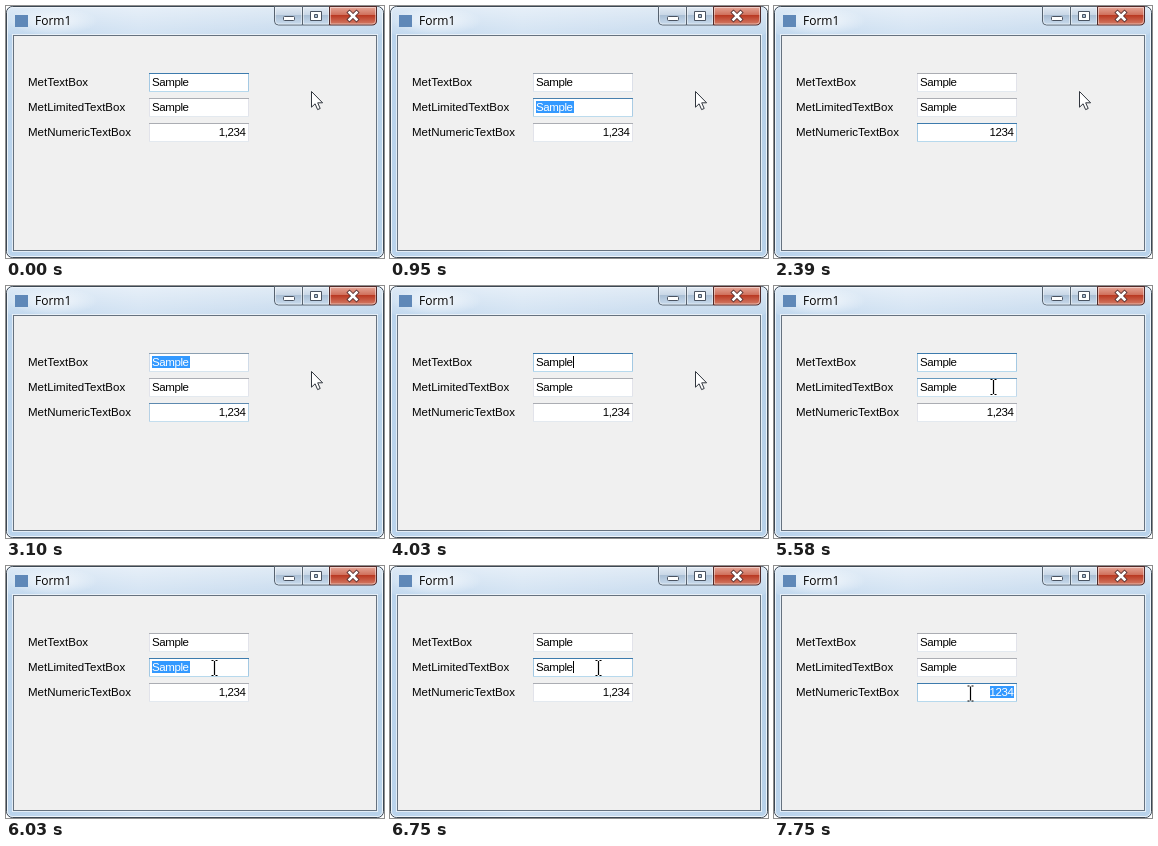
Recreate the animation shown at these times as an HTML page. Size 378x252 px, loop 8 s.

```html
<!DOCTYPE html>
<html lang="en">
<head>
<meta charset="utf-8">
<title>Form1</title>
<style>
html, body { margin: 0; width: 100%; height: 100%; overflow: hidden; background: #fff; }
svg { display: block; width: 378px; height: 252px; }
text { font: 11.5px "Liberation Sans", Arial, sans-serif; }
.title { font: 12px "Open Sans", sans-serif; }
.value { letter-spacing: -.4px; }
</style>
</head>
<body>
<svg viewBox="0 0 378 252">
  <defs>
    <linearGradient id="glass" x2="1" y2="0">
      <stop offset="0" stop-color="#b9d3ec"/><stop offset=".35" stop-color="#cddff1"/>
      <stop offset=".65" stop-color="#c3d8ed"/><stop offset="1" stop-color="#b8d2ea"/>
    </linearGradient>
    <linearGradient id="shine" x2="0" y2="1">
      <stop offset="0" stop-color="#fff" stop-opacity=".5"/><stop offset="1" stop-color="#fff" stop-opacity=".12"/>
    </linearGradient>
    <radialGradient id="glow">
      <stop offset="0" stop-color="#fff" stop-opacity=".75"/><stop offset="1" stop-color="#fff" stop-opacity="0"/>
    </radialGradient>
    <linearGradient id="btn" x2="0" y2="1">
      <stop offset="0" stop-color="#e3ecf5"/><stop offset=".45" stop-color="#c9d7e6"/>
      <stop offset=".46" stop-color="#a9bed4"/><stop offset="1" stop-color="#cadcee"/>
    </linearGradient>
    <linearGradient id="red" x2="0" y2="1">
      <stop offset="0" stop-color="#e6a99b"/><stop offset=".45" stop-color="#d0705c"/>
      <stop offset=".46" stop-color="#b9361f"/><stop offset="1" stop-color="#d6806a"/>
    </linearGradient>
  </defs>

  <rect x=".5" y=".5" width="377" height="251" rx="6" fill="url(#glass)" stroke="#3c4854"/>
  <rect x="1.5" y="1.5" width="375" height="249" rx="5" fill="none" stroke="#fff" stroke-opacity=".75"/>
  <rect x="2" y="2" width="374" height="27" rx="4" fill="url(#shine)"/>
  <ellipse cx="46" cy="15" rx="46" ry="14" fill="url(#glow)"/>
  <rect x="6.5" y="28.5" width="365" height="217" fill="none" stroke="#fff" stroke-opacity=".6"/>
  <rect x="7.5" y="29.5" width="363" height="215" fill="#f0f0f0" stroke="#66727f"/>

  <rect x="9" y="9" width="13" height="12" fill="#5f88b8"/>
  <text class="title" x="29" y="19">Form1</text>

  <g stroke="#56626f">
    <path d="M268.5 .5V15q0 4 4 4H296.5V.5Z" fill="url(#btn)"/>
    <path d="M296.5 .5V19H323.5V.5Z" fill="url(#btn)"/>
    <path d="M323.5 .5V19H366q4.5 0 4.5-4V.5Z" fill="url(#red)" stroke="#4f2a2a"/>
  </g>
  <path d="M269.5 1.5V15q0 3 3 3H295.5V1.5ZM297.5 1.5V18H322.5V1.5ZM324.5 1.5V18H366q3.5 0 3.5-3V1.5Z" fill="none" stroke="#fff" stroke-opacity=".45"/>
  <g fill="#fff" stroke="#4a5361">
    <rect x="277.5" y="10.5" width="11" height="4" rx="1"/>
    <path d="M304.5 5.5h11v9h-11ZM308.5 8.5v3h3v-3Z" fill-rule="evenodd"/>
  </g>
  <path d="M343.5 6.5L350.5 13.5M350.5 6.5L343.5 13.5" stroke="#5b3535" stroke-width="4.4" stroke-linecap="square"/>
  <path d="M343.5 6.5L350.5 13.5M350.5 6.5L343.5 13.5" stroke="#fff" stroke-width="2.6" stroke-linecap="square"/>

  <g id="form"></g>
  <path id="arrow" d="M.5 .5V16.2L4.1 12.8L6.6 18.6L9.2 17.5L6.7 11.8H11.6Z" fill="#fff" stroke="#30353d"/>
  <path id="beam" d="M-3 -7.5H-1M1 -7.5H3M0 -7V7M-3 7.5H-1M1 7.5H3" fill="none" stroke="#000" stroke-width="1.2"/>
</svg>
<script>
const LOOP = 8000, FADE = 280;
const $ = id => document.getElementById(id);

// border colours: top, sides, bottom
const LOOK = {
  normal: [[171, 173, 179], [226, 227, 234], [227, 233, 239]],
  hot: [[87, 148, 191], [183, 213, 234], [199, 226, 241]],
  focus: [[61, 123, 173], [164, 201, 227], [183, 217, 237]]
};

const boxes = [
  { label: "MetTextBox", y: 67, value: "Sample",
    border: [[0, "focus"], [700, "normal"], [3020, "focus"], [5700, "normal"]],
    select: [[3020, 3500]], caret: [[380, 700], [4030, 4560]] },
  { label: "MetLimitedTextBox", y: 92, value: "Sample",
    border: [[0, "normal"], [700, "focus"], [1780, "normal"], [5350, "hot"], [5700, "focus"], [7350, "normal"]],
    select: [[700, 1230], [5700, 6510]], caret: [[6180, 6510], [6750, 7350]] },
  { label: "MetNumericTextBox", y: 117, value: "1,234", plain: "1234", right: true,
    border: [[0, "normal"], [1780, "focus"], [3020, "normal"], [7200, "hot"], [7350, "focus"]],
    select: [[1780, 2390], [7350, LOOP]], caret: [[2870, 3020]] }
];

// pointer moves: start, end, target x, target y
const moves = [
  [4180, 4640, 220, 78],
  [5120, 5540, 219.5, 101],
  [5600, 5690, 208.5, 102],
  [6970, 7300, 196.5, 127.5]
];

function add(parent, tag, attrs, content = "") {
  const el = document.createElementNS("http://www.w3.org/2000/svg", tag);
  for (const k in attrs) el.setAttribute(k, attrs[k]);
  el.textContent = content;
  return parent.appendChild(el);
}

for (const b of boxes) {
  const form = $("form"), y = b.y;
  add(form, "text", { x: 22, y: y + 13 }, b.label);
  add(form, "rect", { x: 143, y, width: 100, height: 19, fill: "#fff" });
  const edge = (x, dy, width, height) => add(form, "rect", { x, y: y + dy, width, height });
  b.sides = [edge(143, 0, 1, 19), edge(242, 0, 1, 19)];
  b.bottom = edge(143, 18, 100, 1);
  b.top = edge(143, 0, 100, 1);
  b.mark = add(form, "rect", { x: b.right ? 216 : 146, y: y + 3, width: b.right ? 24 : 38, height: 12, fill: "#39f" });
  b.text = add(form, "text", { class: "value", x: b.right ? 239.6 : 146, y: y + 13, "text-anchor": b.right ? "end" : "start" }, b.value);
  b.bar = add(form, "rect", { x: b.right ? 239 : 183, y: y + 3, width: 1, height: 12 });
}

const within = (spans, t) => spans.some(([a, z]) => t >= a && t < z);
const show = (el, on) => el.setAttribute("visibility", on ? "visible" : "hidden");

function colours(keys, t) {
  let i = keys.length - 1;
  while (keys[i][0] > t) i--;
  const to = LOOK[keys[i][1]];
  if (!i) return to;
  const from = LOOK[keys[i - 1][1]], k = Math.min(1, (t - keys[i][0]) / FADE);
  return to.map((c, n) => c.map((v, j) => Math.round(from[n][j] + (v - from[n][j]) * k)));
}

function pointer(t) {
  let x = 305, y = 85;
  for (const [a, z, tx, ty] of moves) {
    const p = Math.max(0, Math.min(1, (t - a) / (z - a))), k = p * p * (3 - 2 * p);
    x += (tx - x) * k;
    y += (ty - y) * k;
  }
  return [x, y];
}

function draw(t) {
  for (const b of boxes) {
    const [top, side, bottom] = colours(b.border, t).map(c => `rgb(${c})`);
    b.top.setAttribute("fill", top);
    b.bottom.setAttribute("fill", bottom);
    b.sides.forEach(s => s.setAttribute("fill", side));
    const selected = within(b.select, t);
    show(b.mark, selected);
    b.text.setAttribute("fill", selected ? "#fff" : "#000");
    show(b.bar, within(b.caret, t));
    b.bar.setAttribute("fill", selected ? "#c60" : "#000");
    if (b.plain) {
      const editing = within([[1780, 3020], [7350, LOOP]], t);
      b.text.textContent = editing ? b.plain : b.value;
    }
  }
  const [x, y] = pointer(t);
  const over = x >= 143 && x < 243 && boxes.some(b => y >= b.y && y < b.y + 19);
  for (const id of ["arrow", "beam"]) {
    $(id).setAttribute("transform", `translate(${x} ${y})`);
    show($(id), over === (id === "beam"));
  }
}

const start = performance.now();
function tick() {
  draw((performance.now() - start) % LOOP);
  requestAnimationFrame(tick);
}
tick();
</script>
</body>
</html>
```
